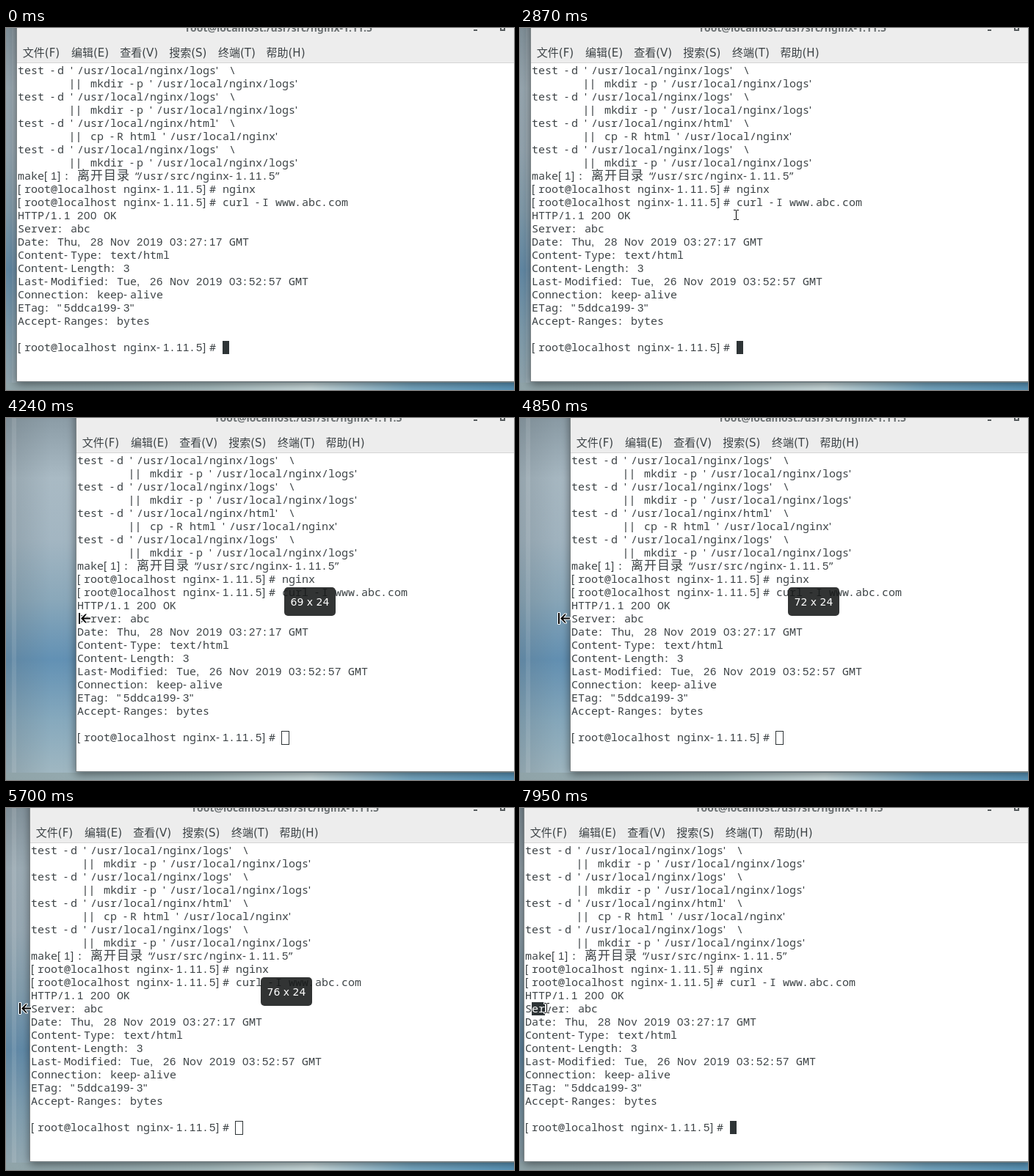
These frames come from a looping animation (692 px wide and 494 px high, 8000 ms). An HTML page with a canvas:

```html
<!DOCTYPE html>
<html>
<head>
<meta charset="utf-8">
<style>
html, body { margin: 0; width: 100%; height: 100%; overflow: hidden; }
canvas { display: block; }
</style>
</head>
<body>
<canvas id="stage" width="692" height="494"></canvas>
<script>
const W = 692, H = 494, LOOP = 8000, RIGHT = 729;
const CELL = 9, LINE = 18, TOP = 49, LEAD = 90;
const INK = '#2e3436', TEXT = '#3d4346';
const DRAG = 3790, RESIZE = 3860, RELEASE = 6710;
const c = document.getElementById('stage').getContext('2d');

const prompt = '[root@localhost nginx-1.11.5]# ';
const lines = [
  ...['logs', 'logs', 'html', 'logs'].flatMap(dir => [
    `test -d '/usr/local/nginx/${dir}' \\`,
    '        || ' + (dir === 'html' ? "cp -R html '/usr/local/nginx'" : `mkdir -p '/usr/local/nginx/${dir}'`)
  ]),
  'make[1]: 离开目录“/usr/src/nginx-1.11.5”',
  prompt + 'nginx',
  prompt + 'curl -I www.abc.com',
  'HTTP/1.1 200 OK',
  'Server: abc',
  'Date: Thu, 28 Nov 2019 03:27:17 GMT',
  'Content-Type: text/html',
  'Content-Length: 3',
  'Last-Modified: Tue, 26 Nov 2019 03:52:57 GMT',
  'Connection: keep-alive',
  'ETag: "5ddca199-3"',
  'Accept-Ranges: bytes',
  '',
  prompt
];
const menu = ['文件(F)', '编辑(E)', '查看(V)', '搜索(S)', '终端(T)', '帮助(H)'];

// Eased track through [time, ...values] keys.
function track(keys, t) {
  const i = keys.findIndex(k => k[0] > t);
  if (i < 1) return keys.at(i).slice(1);
  const a = keys[i - 1], b = keys[i], k = (t - a[0]) / (b[0] - a[0]);
  return a.slice(1).map((v, j) => v + (b[j + 1] - v) * k * k * (3 - 2 * k));
}

const mouseKeys = [
  [70, 472, 465], [860, 299, 238], [1300, 338, 246], [1830, 338, 246], [2110, 259, 238],
  [2480, 468, 238], [3390, 28, 281], [3630, 9, 273], [RELEASE, 8, 273], [7020, 17, 273],
  [7800, 17, 273], [7950, 36, 273]
];
// Window edge, in cells
const edgeKeys = [[3880, 1], [4240, 10], [4640, 10], [4850, 7], [5400, 4], [5600, 3], [5780, 3], [6300, -1]];

const cells = t => track(edgeKeys, t)[0];
const edge = t => 6 + CELL * Math.max(0, Math.round(cells(t)));

// While dragging, the pointer runs one cell ahead of the edge.
function mouse(t) {
  const dragged = t >= DRAG && t < RELEASE;
  const at = dragged ? [CELL * (cells(t + LEAD) + (t < 4440 ? 1 : -1)), 273] : track(mouseKeys, t);
  return at.map(Math.round);
}

// row, first column, press, release, cleared
const drags = [[10, 31, 900, 1300, 2110], [10, 31, 2160, 2480, 2700], [12, 1, 7800, LOOP, LOOP]];

function selection(t, left) {
  const drag = drags.find(d => t >= d[2] && t < d[4]);
  if (!drag) return { row: -1 };
  const [row, from, , release] = drag;
  return { row, from, to: Math.max(from, Math.floor((mouse(Math.min(t, release))[0] - left - 1) / CELL)) };
}

function caretOn(t) {
  if (t > 2500 && t < RESIZE) return true;
  const since = t < RESIZE ? t + 230 : t - 6650;
  return Math.floor(since / 600) % 2 === 0;
}

function rect(color, x, y, w, h) {
  c.fillStyle = color;
  c.fillRect(x, y, w, h);
}

function gradient(x1, y1, colors) {
  const g = c.createLinearGradient(0, 0, x1, y1);
  colors.forEach((color, i) => g.addColorStop(i / (colors.length - 1), color));
  return g;
}

function label(text, x, y, font, color) {
  c.font = font;
  c.fillStyle = color;
  c.textAlign = 'center';
  c.fillText(text, x, y);
}

function desktop() {
  rect(gradient(0, H, ['#8b9ca6', '#a9bac4', '#a3b6c2', '#8aa8ba', '#6291b4', '#86a9bd', '#a3b9c2']), 0, 0, W, H);
  rect(gradient(60, 0, ['rgba(90,100,105,.25)', 'rgba(90,100,105,0)']), 0, 0, 60, H);
  rect('rgba(255,255,255,.1)', 8, 0, 6, H);
  rect(gradient(W, 0, ['#8fa3a8', '#97adb2', '#a9bfc2', '#cfe0e2', '#78abc6', '#5b98bd']), 0, 484, W, 10);
}

function frame(left) {
  c.save();
  c.shadowColor = 'rgba(0,0,0,.5)';
  c.shadowBlur = 12;
  c.shadowOffsetY = 3;
  rect('#7d8486', left - 1, -20, W, 503);
  c.restore();
  rect('#fff', left, 0, W, 482);
  rect('#ededed', left, 0, W, 47);
  rect('#d5d5d5', left, 47, W, 1);
  label('root@localhost:/usr/src/nginx-1.11.5', (left + RIGHT) / 2, 5, 'bold 14px "Noto Sans", sans-serif', '#6c7173');
  rect('#555a5c', 637, 2, 5, 2);
  c.strokeStyle = '#555a5c';
  c.lineWidth = 2;
  c.strokeRect(674, -3, 5, 6);
  menu.forEach((m, i) => label(m, left + 33 + i * 66.6, 39,
    '15px "DejaVu Sans", "Noto Sans CJK SC", sans-serif', TEXT));
}

// Each sign starts at the left of its cell; narrow ones leave a gap behind.
function glyph(ch, x, y) {
  if (ch > '\u3000') c.font = '17px "Noto Sans CJK SC", "Noto Sans CJK", sans-serif';
  else if (/[\d[\],'"|-]/.test(ch)) c.font = '15px "Liberation Sans", sans-serif';
  else if (ch > '~') c.font = '15px "Noto Sans", sans-serif';
  else c.font = '300 15px "Noto Sans Mono", monospace';
  const shift = ch === '“' ? 7 : '.:'.includes(ch) ? -1 : 0;
  c.fillText(ch, x + shift, y);
}

function terminal(left, sel) {
  c.textAlign = 'left';
  lines.forEach((text, row) => {
    const y = TOP + row * LINE;
    let x = left + 1;
    const marked = col => row === sel.row && col >= sel.from && col < sel.to;
    [...text].forEach((ch, col) => {
      if (marked(col)) rect(INK, x, y, CELL, LINE);
      c.fillStyle = marked(col) ? '#fff' : TEXT;
      glyph(ch, x, y + 14);
      x += ch > '\u3000' ? 2 * CELL : CELL;
    });
  });
}

function caret(left, t, resizing) {
  const x = left + 1 + prompt.length * CELL, y = TOP + 21 * LINE;
  if (resizing) {
    c.strokeStyle = INK;
    c.lineWidth = 1;
    c.strokeRect(x - .5, y + .5, 10, 18);
  } else if (caretOn(t)) rect(INK, x, y, CELL, LINE);
}

function badge(left) {
  const x = Math.floor((left + RIGHT) / 2 + 1.5);
  c.fillStyle = 'rgba(22,24,24,.88)';
  c.beginPath();
  c.roundRect(x - 35, 231, 70, 39, 5);
  c.fill();
  label(`${79 - (left - 6) / CELL} x 24`, x, 256, '14px "DejaVu Sans", sans-serif', '#fff');
}

function outlined(d, x, y) {
  const shape = new Path2D(d);
  c.save();
  c.translate(x, y);
  c.lineJoin = 'round';
  c.strokeStyle = '#fff';
  c.lineWidth = 2;
  c.stroke(shape);
  c.fillStyle = '#000';
  c.fill(shape);
  c.restore();
}

const beam = 'M-3 -7h3v1h1v-1h3v1h-3v12h3v1h-3v-1h-1v1h-3v-1h3v-12h-3z';
const resizer = 'M0 -7h2v15h-2z M3 .5l6-6h2l-4 5h9v2h-9l4 5h-2z';

function draw(t) {
  const left = edge(t), resizing = t >= RESIZE && t < RELEASE;
  desktop();
  frame(left);
  terminal(left, selection(t, left));
  caret(left, t, resizing);
  if (resizing) badge(edge(t + LEAD));
  if (t >= 70) outlined(t >= 3470 && t < RELEASE ? resizer : beam, ...mouse(t));
}

function tick(now) {
  draw(now % LOOP);
  requestAnimationFrame(tick);
}
requestAnimationFrame(tick);
</script>
</body>
</html>
```
